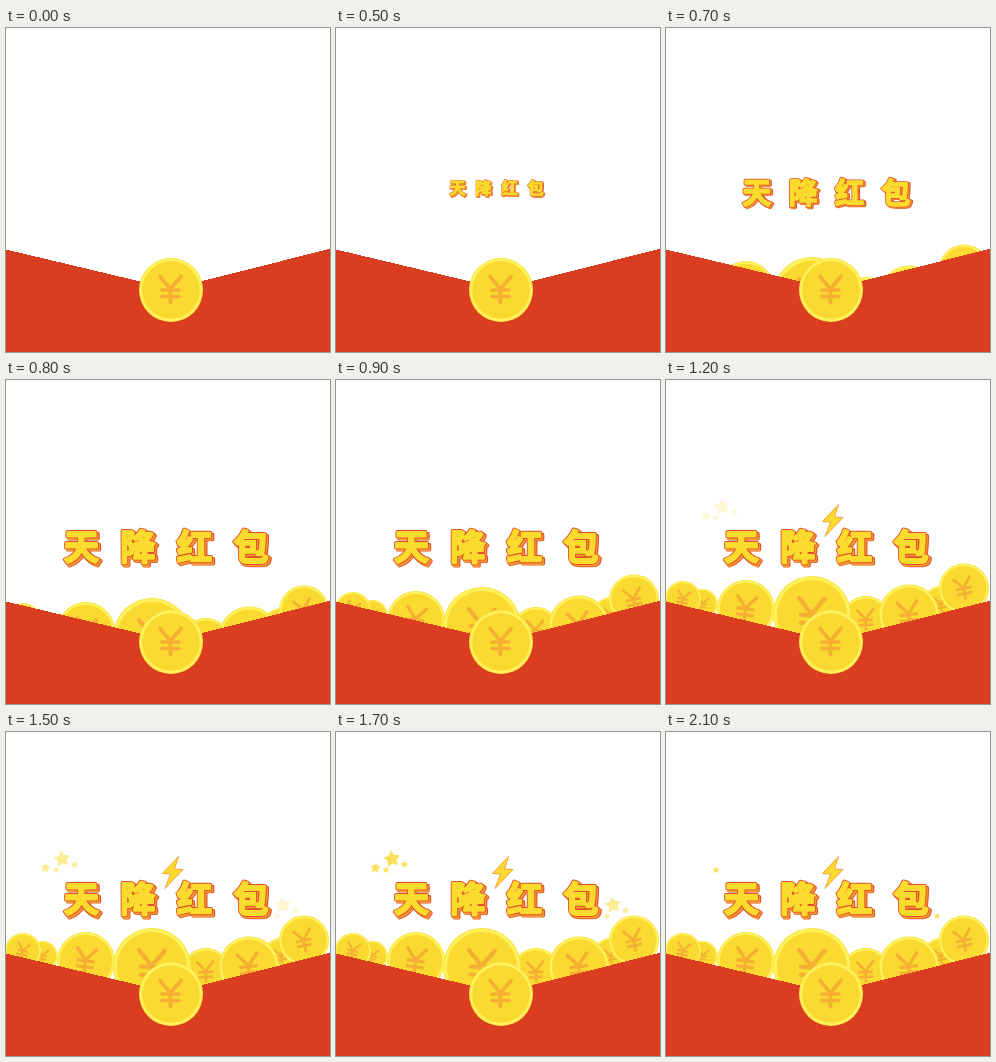
An HTML page that plays this animation: 324x324 px, repeating every 2.2 s.

```html
<!DOCTYPE html>
<html lang="zh">
<head>
<meta charset="utf-8">
<title>天降红包</title>
<style>
  html, body { margin: 0; width: 100%; height: 100%; overflow: hidden; background: #fff; }
  svg { display: block; width: 100vw; height: 100vh; }
  text {
    font: 900 35.5px "Noto Sans CJK SC", "Noto Sans CJK", sans-serif;
    text-anchor: middle;
    stroke-linejoin: round;
  }
</style>
</head>
<body>
<svg viewBox="0 0 324 324">
  <defs>
    <g id="coin">
      <circle r="32" fill="#f7dc3a"/>
      <circle r="31.4" fill="#fff15a"/>
      <circle r="28.8" fill="#fad931"/>
      <path d="M-11-13.5L-.5-1L10-13.5M-.5-1V13M-9 0H8M-9 6.5H8"
        fill="none" stroke="#f5b033" stroke-width="3.6" stroke-linecap="round" stroke-linejoin="round"/>
    </g>
    <polygon id="star" fill="#fbd92e" stroke="#fbd92e" stroke-width=".15" stroke-linejoin="round"/>
  </defs>
  <g id="coins"></g>
  <path d="M0 221.500L165 260.800L324 220.800V324H0Z" fill="#da3d20" shape-rendering="crispEdges"/>
  <use href="#coin" x="165" y="262"/>
  <g id="stars"></g>
  <g id="title"></g>
  <path id="bolt" d="M172.500 124.500L156.500 141.500L164.500 142L159 156.500L177 137.500L168.500 137Z"
    fill="#fbd92e" stroke="#f39a31" stroke-width=".9" stroke-linejoin="round"/>
</svg>
<script>
const LOOP = 2200, STEP = 100, CX = 165;
const $ = id => document.getElementById(id);
const clamp = v => Math.max(0, Math.min(1, v));

function add(parent, tag, attrs = {}, text = '') {
  const el = document.createElementNS('http://www.w3.org/2000/svg', tag);
  for (const k in attrs) el.setAttribute(k, attrs[k]);
  el.textContent = text;
  parent.append(el);
  return el;
}

function place(parent, shape, x, y, size, tilt) {
  return add(parent, 'use', {
    href: '#' + shape, transform: `translate(${x} ${y}) rotate(${tilt}) scale(${size})`
  });
}

// Coins lean away from the middle of the envelope
function coin(x, y, r) {
  place($('coins'), 'coin', x, y, r / 32, (CX - x) * .09);
}
coin(36.5, 224, 15);
coin(275, 224, 18);
coin(200, 240, 24);
coin(17, 219, 18);
coin(80, 229, 29);
coin(146, 235, 39);
coin(243, 234.5, 30);
coin(298, 208.5, 25);

function layer(depth, color, width) {
  [...'天降红包'].forEach((ch, i) => add($('title'), 'text', {
    x: 75.5 + i * 56.5 + depth, y: 180.3 + depth, fill: color, stroke: color, 'stroke-width': width
  }, ch));
}
layer(2, '#e2502a', 4.4);
layer(1.4, '#f39a31', 3.2);
layer(0, '#e2502a', 3.8);
layer(0, '#fbdb2d', 2);

$('star').setAttribute('points', Array.from({ length: 10 }, (_, i) => {
  const a = (i - 2.5) * Math.PI / 5, r = i % 2 ? .5 : 1;
  return `${(r * Math.cos(a)).toFixed(3)},${(r * Math.sin(a)).toFixed(3)}`;
}).join(' '));

// One big star and satellites; the lowest satellite stays lit
function cluster(x, y, delay) {
  const all = add($('stars'), 'g', { transform: `translate(${x} ${y})` });
  const fading = add(all, 'g');
  place(fading, 'star', 0, 0, 7.6, -8);
  place(fading, 'star', -16.5, 9, 4.7, 8);
  place(fading, 'star', 12.5, 5.5, 3.3, 8);
  place(all, 'star', -6, 11, 3, 8);
  return t => {
    const u = t - delay;
    all.setAttribute('opacity', u < 1200 ? 0 : .2 + .6 * clamp((u - 1300) / 400));
    fading.setAttribute('opacity', u < 1900 ? 1 : 0);
  };
}
const clusters = [cluster(56, 127, 0), cluster(277, 173, 200)];

function draw(time) {
  const t = Math.floor(time % LOOP / STEP) * STEP;
  const zoom = t < 300 ? 0 : clamp(.1 + (t - 300) * .0018);
  $('title').setAttribute('transform', `translate(161 154.5) scale(${zoom}) translate(-161 -154.5)`);
  $('coins').setAttribute('transform', `translate(0 ${Math.max(0, (1000 - t) * .11)})`);
  $('bolt').setAttribute('opacity', clamp((t - 1000) / 200));
  clusters.forEach(update => update(t));
}

const start = performance.now();
function tick() {
  draw(performance.now() - start);
  requestAnimationFrame(tick);
}
tick();
</script>
</body>
</html>
```
